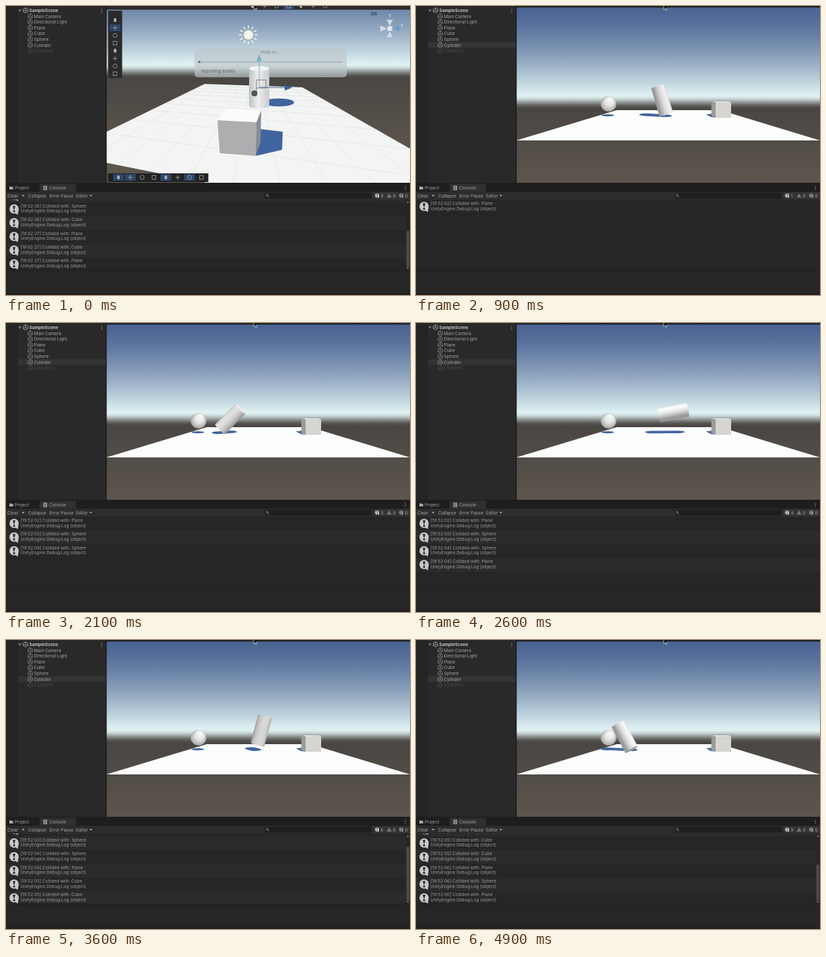
Write an HTML page with a canvas that moves like this. It is 600 px wide and 430 px high and loops after 5 s.

```html
<!DOCTYPE html>
<html lang="en">
<head>
<meta charset="utf-8">
<title>Collision log</title>
<style>
html, body { margin: 0; width: 100%; height: 100%; overflow: hidden; background: #262626; }
canvas { display: block; width: 600px; height: 430px; }
</style>
</head>
<body>
<canvas id="stage" width="600" height="430"></canvas>
<script>
const ctx = document.getElementById('stage').getContext('2d');
const LOOP = 5000, STEP = 100, GRAVITY = 0.0001;
const FONT = 'Inter, "Liberation Sans", sans-serif';
const SHADOW = '#42659f';
const LABEL = '#a6a6a6';

// Bounces of the cylinder; it flies freely between them
const BOUNCES = [
  { t: 800, x: 374, y: 144, tilt: 0 },
  { t: 1400, x: 323, y: 152, tilt: -100 },
  { t: 2100, x: 333, y: 143, tilt: -135 },
  { t: 2400, x: 354, y: 148, tilt: -118 },
  { t: 3000, x: 439, y: 128, tilt: -67 },
  { t: 3600, x: 379, y: 135, tilt: -165 },
  { t: 4000, x: 326, y: 145, tilt: -203 },
  { t: 4400, x: 316, y: 149, tilt: -220 },
  { t: 4900, x: 310, y: 144, tilt: -208 }
];

const HITS = [
  [100, 'Plane'], [1500, 'Sphere'], [2000, 'Sphere'], [2400, 'Plane'], [2900, 'Cube'],
  [3200, 'Cube'], [4000, 'Plane'], [4300, 'Sphere'], [4700, 'Plane']
];
const entry = (clock, name) => `[${clock}] Collided with: ${name}`;
const OLD_LOGS = 'Plane Sphere Plane Cube Sphere Cube Plane Cube Plane'.split(' ')
  .map((name, i) => entry(`18:02:${24 + Math.min(3, i >> 1)}`, name));

const mix = (a, b, f) => a + (b - a) * f;
const clamp = v => Math.min(1, Math.max(0, v));
const smooth = v => { v = clamp(v); return v * v * (3 - 2 * v); };
const blend = (a, b, f) => a.map((v, i) => mix(v, b[i], f));
const rgb = c => `rgb(${c.map(Math.round)})`;

function rect(x, y, w, h, fill) {
  ctx.fillStyle = fill;
  ctx.fillRect(x, y, w, h);
}

function round(x, y, w, h, r, fill) {
  ctx.fillStyle = fill;
  ctx.beginPath();
  ctx.roundRect(x, y, w, h, r);
  ctx.fill();
}

function trace(p) {
  ctx.beginPath();
  for (let i = 0; i < p.length; i += 2) ctx.lineTo(p[i], p[i + 1]);
}

function poly(fill, ...p) {
  ctx.fillStyle = fill;
  trace(p);
  ctx.fill();
}

function line(color, width, ...p) {
  ctx.strokeStyle = color;
  ctx.lineWidth = width;
  trace(p);
  ctx.stroke();
}

function oval(x, y, rx, ry, fill) {
  ctx.fillStyle = fill;
  ctx.beginPath();
  ctx.ellipse(x, y, rx, ry, 0, 0, Math.PI * 2);
  ctx.fill();
}

function ring(x, y, r, color, width = 0.8) {
  ctx.strokeStyle = color;
  ctx.lineWidth = width;
  ctx.beginPath();
  ctx.arc(x, y, r, 0, Math.PI * 2);
  ctx.stroke();
}

// y is the middle of the capital letters
function text(s, x, y, color = LABEL, weight = 400, align = 'left') {
  ctx.font = `${weight} 6.45px ${FONT}`;
  ctx.textAlign = align;
  ctx.fillStyle = color;
  ctx.fillText(s, x, y + 2.3);
}

// Triangle pointing along (dx, dy)
function arrow(x, y, dx, dy, half, fill) {
  const k = half / Math.hypot(dx, dy);
  poly(fill, x - dy * k, y + dx * k, x + dy * k, y - dx * k, x + dx, y + dy);
}

function dots(x, y) {
  for (let i = -1; i < 2; i++) rect(x - 0.5, y + i * 2.2 - 0.5, 1.1, 1.1, LABEL);
}

function sky(horizon) {
  const high = [74, 100, 146], pale = [224, 242, 243], near = [74, 70, 67], low = [93, 86, 77];
  const g = ctx.createLinearGradient(0, 0, 0, 264);
  for (let y = 0; y <= 264; y += 3) {
    const d = y - horizon;
    const c = d < -10
      ? blend(pale, high, 1 - Math.pow(clamp(1 + (d + 10) / 132), 1.45))
      : blend(pale, blend(near, low, clamp((d - 12) / 108)), smooth((d + 10) / 20));
    g.addColorStop(y / 264, rgb(c));
  }
  rect(149, 0, 451, 263, g);
}

function cubeIcon(x, y, color) {
  const p = [];
  for (let i = 0; i <= 6; i++) {
    const a = (i + 0.5) * Math.PI / 3;
    p.push(x + 3.8 * Math.cos(a), y + 3.8 * Math.sin(a));
  }
  line(color, 0.7, ...p);
  for (let i = 0; i < 6; i += 2) line(color, 0.7, x, y, p[2 * i], p[2 * i + 1]);
}

function hierarchy(selected) {
  rect(0, 0, 149, 263, '#292929');
  rect(0, 0, 18, 263, '#252525');
  rect(148, 0, 1.5, 264, '#191919');
  arrow(20.7, 5.2, 0, 3.5, 2.3, '#808080');
  cubeIcon(29, 6.5, '#c0c0c0');
  text('SampleScene', 34.5, 6.7, '#c4c4c4', 700);
  dots(142, 7);
  const names = ['Main Camera', 'Directional Light', 'Plane', 'Cube', 'Sphere', 'Cylinder', 'Cylinder2'];
  names.forEach((name, i) => {
    const y = 15.2 + i * 8.6, off = i === 6;
    if (selected && i === 5) rect(18, y - 4.3, 130, 8.6, '#343434');
    cubeIcon(36, y, off ? '#505050' : '#969696');
    text(name, 41.5, y, off ? '#4c4c4c' : LABEL);
  });
}

function alertIcon(x, y, r, color) {
  oval(x, y, r, r, color);
  poly(color, x + r * 0.1, y + r * 0.8, x + r * 0.95, y + r * 0.3, x + r * 0.8, y + r * 1.25);
  arrow(x, y - r * 0.65, 0, r, r * 0.28, '#222');
  oval(x, y + r * 0.52, r * 0.22, r * 0.22, '#222');
}

function logList(logs) {
  const pitch = 20.4, n = logs.length, scroll = n > 5;
  const top = scroll ? 394.4 - n * pitch : 288.5;
  ctx.save();
  ctx.beginPath();
  ctx.rect(0, 288, 600, 104.5);
  ctx.clip();
  logs.forEach((log, i) => {
    const y = top + i * pitch;
    rect(0, y, 600, pitch, i % 2 ? '#2b2b2b' : '#262626');
    alertIcon(12, y + 9.6, 6.9, '#c9c9c9');
    text(log, 21.5, y + 5, '#9c9c9c');
    text('UnityEngine.Debug:Log (object)', 21.5, y + 12.7, '#9c9c9c');
  });
  if (scroll) {
    const h = 485 / n;
    rect(593.5, 288, 6.5, 104, '#252525');
    round(594.5, 388 - h, 4.5, h, 2, '#4c4c4c');
    arrow(596.8, 293, 0, -2.4, 1.8, '#858585');
    arrow(596.8, 388.8, 0, 2.4, 1.8, '#858585');
  }
  ctx.restore();
}

function consolePanel(logs) {
  rect(0, 263, 600, 167, '#262626');
  logList(logs);
  rect(0, 392.5, 600, 1, '#1d1d1d');
  rect(0, 427, 600, 3, '#212121');

  rect(0, 263, 600, 13.5, '#1e1e1e');
  rect(50, 264.5, 54, 12, '#303030');
  rect(5, 268.4, 2.6, 1.5, LABEL);
  rect(5, 269, 5.6, 4, LABEL);
  text('Project', 13, 270.7);
  rect(55.5, 267.5, 5.5, 6.5, LABEL);
  for (let i = 0; i < 3; i++) rect(56.5, 268.8 + i * 1.8, 3.5, 0.7, '#303030');
  text('Console', 64, 270.7);
  dots(593, 270.5);

  rect(0, 276.5, 600, 11.5, '#2d2d2d');
  text('Clear', 2, 282.3);
  text('Collapse', 33, 282.3);
  text('Error Pause', 64.5, 282.3);
  text('Editor', 104, 282.3);
  for (const x of [25.5, 126]) arrow(x, 281, 0, 2.7, 2, LABEL);
  round(384, 277.8, 159, 9, 2, '#1f1f1f');
  ring(387.8, 281.6, 1.5, LABEL, 0.7);
  line(LABEL, 0.8, 388.9, 282.8, 390.6, 284.4);
  rect(546, 277, 54, 10.5, '#343434');
  alertIcon(551.2, 282, 3, '#c9c9c9');
  text(logs.length, 556.5, 282.3);
  arrow(569, 285, 0, -6.2, 3.5, '#777');
  text('0', 574.5, 282.3);
  alertIcon(587, 282, 3, '#929292');
  text('0', 592.5, 282.3);
}

function cursor() {
  const shape = [368, -3, 368, 5.4, 369.8, 4, 371, 6.8, 372.4, 6.2, 371.2, 3.5, 373.6, 3.2];
  poly('#111', ...shape);
  line('#e8e8e8', 0.7, ...shape);
}

function pose(t) {
  const i = BOUNCES.findIndex(b => b.t >= t);
  if (i < 1) return BOUNCES[0];
  const a = BOUNCES[i - 1], b = BOUNCES[i], f = (t - a.t) / (b.t - a.t);
  return {
    x: mix(a.x, b.x, f),
    y: mix(a.y, b.y, f) - GRAVITY * (t - a.t) * (b.t - t),
    tilt: mix(a.tilt, b.tilt, f)
  };
}

const grey = light => rgb(Array(3).fill(Math.min(254, 152 + 112 * Math.max(0, light))));

function cylinder({ x, y, tilt }) {
  const a = tilt * Math.PI / 180, r = 10.5, half = 22;
  const c = Math.cos(a), s = Math.sin(a);

  // The shadow slides left with height above the floor
  const cast = k => {
    const h = 165 - y + k * c;
    return [x + k * s - 0.4 * h, (163.5 - 0.04 * h) * 5];
  };
  ctx.save();
  ctx.scale(1, 0.2);
  ctx.lineCap = 'round';
  line(SHADOW, 19, ...cast(half), ...cast(-half));
  ctx.restore();

  return () => {
    const facing = (s * (374 - x) - c * (143 - y)) / 228;
    const bow = Math.max(1, Math.abs(facing) * r), end = Math.sign(facing);
    const g = ctx.createLinearGradient(-r, 0, r, 0);
    for (let i = 0; i <= 10; i++) {
      const u = i / 5 - 1;
      g.addColorStop(i / 10, grey(u * (0.32 * c - 0.77 * s) + 0.56 * Math.sqrt(1 - u * u)));
    }
    ctx.save();
    ctx.translate(x, y);
    ctx.rotate(a);
    ctx.fillStyle = g;
    ctx.beginPath();
    ctx.ellipse(0, bow / 2 - half, r, bow, 0, Math.PI, 0);
    ctx.ellipse(0, half - bow / 2, r, bow, 0, 0, Math.PI);
    ctx.fill();
    if (bow > 1) oval(0, end * (bow / 2 - half), r, bow, grey(end * (0.32 * s + 0.77 * c)));
    ctx.restore();
  };
}

function gameView(t) {
  sky(143);
  rect(149, 0, 451, 2.3, '#1f1f1f');
  poly('#fcfdfd', 298, 155, 452, 155, 600, 200, 149, 200);
  oval(284.8, 162.6, 9.7, 1.6, SHADOW);
  poly(SHADOW, 430.5, 161.2, 440, 160.2, 446, 166, 438, 165.2);
  const drawCylinder = cylinder(pose(t));

  const g = ctx.createRadialGradient(289, 138, 1, 286, 145.5, 12.5);
  g.addColorStop(0, '#fbfbfa');
  g.addColorStop(0.5, '#e4e4e2');
  g.addColorStop(1, '#9f9f9e');
  oval(286, 145.4, 11.6, 11.4, g);

  poly('#f0f0ee', 438.6, 142, 464, 142, 468, 143.4, 445, 143.4);
  poly('#9b9b99', 438.6, 142, 445.2, 143.2, 445.2, 166.4, 438.6, 164);
  rect(445, 143.2, 23, 23.2, '#d6d5d1');
  drawCylinder();
}

// Perspective map of the unit square onto corners a, b, c, d
function project(a, b, c, d) {
  const [sx, sy] = [0, 1].map(i => a[i] - b[i] + c[i] - d[i]);
  const [px, py, qx, qy] = [b[0] - c[0], b[1] - c[1], d[0] - c[0], d[1] - c[1]];
  const den = px * qy - qx * py;
  const g = (sx * qy - qx * sy) / den, h = (px * sy - sx * py) / den;
  return (u, v) => [0, 1].map(i =>
    ((b[i] - a[i] + g * b[i]) * u + (d[i] - a[i] + h * d[i]) * v + a[i]) / (g * u + h * v + 1));
}

function tools(x, y, n, dx, dy, lit) {
  for (let i = 0; i < n; i++) {
    const cx = x + i * dx, cy = y + i * dy, kind = i % 4;
    if (lit.includes(i)) rect(cx - 8, cy - 5, 16, 10, '#2d466b');
    if (kind === 0) round(cx - 2, cy - 3, 4, 6, 2, '#b0b0b0');
    if (kind === 1) {
      line('#b0b0b0', 0.8, cx - 3.5, cy, cx + 3.5, cy);
      line('#b0b0b0', 0.8, cx, cy - 3.5, cx, cy + 3.5);
    }
    if (kind === 2) ring(cx, cy, 3, '#a8a8a8');
    if (kind === 3) {
      ctx.strokeStyle = '#a8a8a8';
      ctx.strokeRect(cx - 2.8, cy - 2.8, 5.6, 5.6);
    }
  }
}

function dialog() {
  round(280, 64, 226, 42, 5, 'rgba(190,199,202,.68)');
  text('Hold on...', 393, 69, '#7b8386', 400, 'center');
  round(286, 82, 214, 2.5, 1, 'rgba(165,175,180,.6)');
  oval(287, 83.3, 1.7, 1.7, '#5e6b78');
  text('Importing assets', 290, 97, '#5a5f62');
}

function axes() {
  for (const [dx, dy] of [[1, 0], [-1, 0], [0, 1], [0, -1]]) {
    arrow(570 + dx * 14, 33.5 + dy * 13, -dx * 10, -dy * 9, 4.5, dx > 0 ? '#6f9cc8' : '#d5dbe1');
  }
  rect(566.5, 30, 7, 7, '#e3e5e6');
  text('y', 570, 14, '#e0e6ea', 400, 'center');
  text('z', 588, 29, '#e0e6ea', 400, 'center');
  text('Persp', 572, 60, '#c3ced6', 400, 'center');
}

function sun(x, y) {
  for (let i = 0; i < 12; i++) {
    const a = i * Math.PI / 6, c = Math.cos(a), s = Math.sin(a);
    line('#f2f2ea', 1.5, x + 9.5 * c, y + 9.5 * s, x + 14 * c, y + 14 * s);
  }
  oval(x, y, 7.6, 7.6, '#f4f4ec');
  ring(x, y, 7.6, '#88928f', 0.7);
}

function floor() {
  const corners = [[295, 116], [440, 121], [900, 383], [82, 220]];
  const at = project(...corners), cells = 10;
  poly('#f3f4f4', ...corners.flat());
  for (let i = 1; i < cells; i++) {
    const k = i / cells;
    line('#e0e3e4', 0.7, ...at(k, 0), ...at(k, 1));
    line('#e0e3e4', 0.7, ...at(0, k), ...at(1, k));
  }
}

function sceneView() {
  ctx.save();
  ctx.beginPath();
  ctx.rect(149, 0, 451, 263);
  ctx.clip();
  sky(97);
  floor();
  poly(SHADOW, 377, 183, 411, 187, 410, 214, 371, 223);
  poly('#fbfbfb', 314, 170, 328, 153, 379, 155, 372, 173);
  poly('#acaeb0', 314, 170, 372, 173, 370.5, 223, 317.5, 219);
  poly('#878d94', 372, 173, 379, 155, 378, 203, 370.5, 223);
  oval(405, 143.5, 23, 6, SHADOW);
  dialog();

  const body = ctx.createLinearGradient(361, 0, 391, 0);
  body.addColorStop(0, '#bfc2c3');
  body.addColorStop(0.45, '#eeefef');
  body.addColorStop(1, '#c9cccd');
  oval(376, 148.5, 15, 4, body);
  rect(361, 93, 30, 55.5, body);
  oval(376, 93, 15, 3.8, '#f2f3f3');
  line('#7fa9b8', 1, 376, 121, 376, 82);
  arrow(376, 82, 0, -10.5, 4.2, '#7fb2c0');
  line('#4570a5', 1, 376, 121, 416, 121.5);
  arrow(414, 121.5, 11, 0, 4.2, '#365f93');
  line('#667', 0.8, 372, 127, 372, 110, 386, 110, 386, 122, 372, 122);
  oval(369, 130, 4, 4, '#57595b');
  ring(369, 130, 4, '#303234');

  sun(360, 43);
  axes();
  rect(149, 0, 451, 5.5, '#2b2b2b');
  tools(366, 0, 7, 18, 0, [3]);
  rect(542, 9, 9, 5, 'rgba(40,60,95,.45)');
  rect(151.5, 7, 21, 100, '#2a2a2a');
  tools(162, 21, 8, 0, 11.4, [1]);
  rect(151.5, 249, 149, 13, '#222');
  tools(167, 255, 8, 17.6, 0, [0, 1, 4, 6]);
  ctx.restore();
}

function draw(t) {
  const editing = t < STEP;
  if (editing) sceneView();
  else gameView(t);
  hierarchy(t >= 400);
  consolePanel(editing ? OLD_LOGS : HITS.filter(([at]) => at <= t)
    .map(([at, name]) => entry(`19:52:0${Math.floor((at + 2100) / 1000)}`, name)));
  cursor();
}

const start = performance.now();
function tick() {
  const t = (performance.now() - start) % LOOP;
  draw(Math.floor(t / STEP) * STEP);
  requestAnimationFrame(tick);
}
tick();
</script>
</body>
</html>
```
